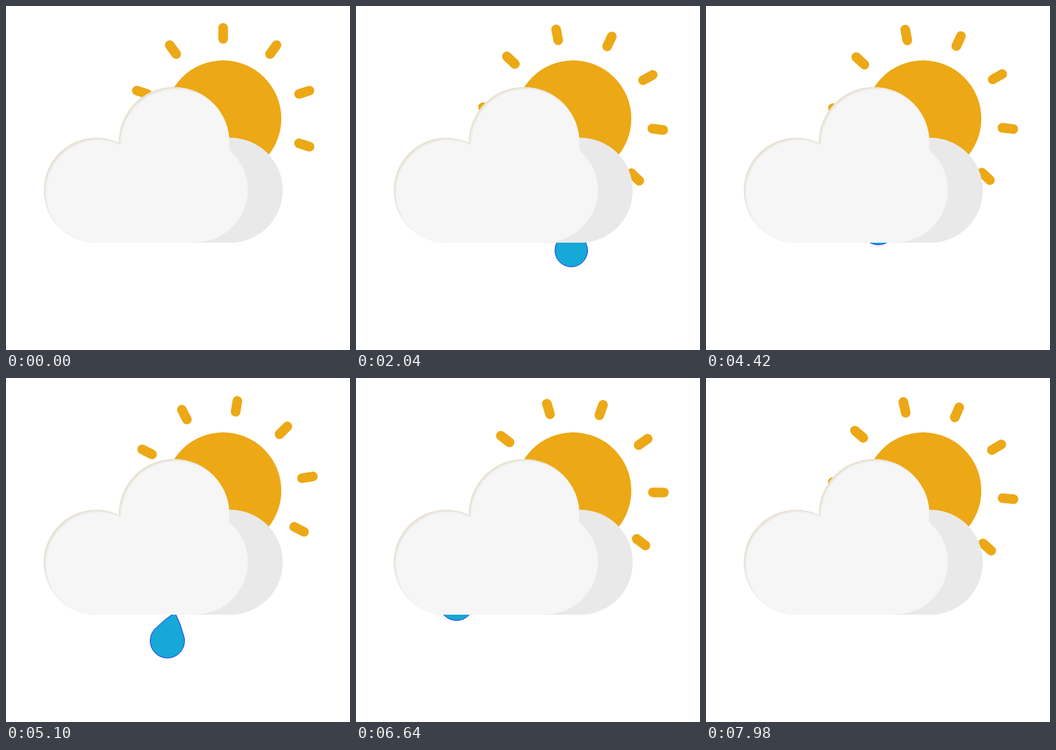
An HTML page with a canvas for the animation above (8000 ms loop, 500 px wide and 500 px high).

```html
<!DOCTYPE html>
<html lang="en">
<head>
<meta charset="utf-8">
<title>Sun, cloud and rain</title>
<style>
  html, body { margin: 0; width: 100%; height: 100%; overflow: hidden; background: #fff; }
  canvas { display: block; width: 100vw; height: 100vh; }
</style>
</head>
<body>
<canvas id="stage" width="500" height="500"></canvas>
<script>
const ctx = document.getElementById('stage').getContext('2d');
const LOOP = 8000, RAIN = 4000, TURN = 12000;
const SUN = { x: 315.6, y: 163.7, r: 84.6 };
const ORANGE = '#eca815', BLUE = '#16a8d6';
const TILT = 15 * Math.PI / 180;

// end: time of vanishing; x, bottom: resting centre x and lower edge at that time
const drops = [
  { end: 1255, x: 230.5, bottom: 422, size: 1 },
  { end: 2465, x: 302.7, bottom: 417, size: 0.95 },
  { end: 3410, x: 127.4, bottom: 422, size: 1 }
];

function cloudPath(right, y, withTop) {
  const p = new Path2D();
  const circle = (cx, cy, r) => { p.moveTo(cx + r, cy); p.arc(cx, cy, r, 0, 2 * Math.PI); };
  circle(131.2, 267.8, 76.3);
  circle(right, y, 76.3);
  p.rect(131, 230, right - 131, 114);
  if (withTop) circle(244.2, 197.8, 80.4);
  return p;
}

const backCloud = cloudPath(326, 267.8, false);
const frontCloud = cloudPath(275.3, 267.2, true);

function drawSun(t) {
  ctx.save();
  ctx.fillStyle = ctx.strokeStyle = ORANGE;
  ctx.beginPath();
  ctx.arc(SUN.x, SUN.y, SUN.r, 0, 2 * Math.PI);
  ctx.fill();
  ctx.translate(SUN.x, SUN.y);
  ctx.rotate(t / TURN * 2 * Math.PI);
  ctx.lineWidth = 14;
  ctx.lineCap = 'round';
  for (let i = 0; i < 10; i++) {
    ctx.beginPath();
    ctx.moveTo(0, -116);
    ctx.lineTo(0, -132);
    ctx.stroke();
    ctx.rotate(Math.PI / 5);
  }
  ctx.restore();
}

function drawDrop(drop, t) {
  const left = drop.end - t;
  if (left < 0 || left > 1000) return;
  const rise = drop.size * (0.098 * left - 1e-5 * left * left);
  const r = 25, tip = 42.5, bulge = 2;
  const half = Math.acos(r / tip);
  const a = half - Math.PI / 2;
  const px = r * Math.cos(a), py = r * Math.sin(a);
  // control point: middle of the flank, pushed outwards
  const cx = px / 2 + bulge * Math.cos(a);
  const cy = (py - tip) / 2 + bulge * Math.sin(a);
  ctx.save();
  ctx.translate(drop.x + rise * Math.tan(TILT), drop.bottom - r * drop.size - rise);
  ctx.rotate(TILT);
  ctx.scale(drop.size, drop.size);
  ctx.beginPath();
  ctx.moveTo(0, -tip);
  ctx.quadraticCurveTo(cx, cy, px, py);
  ctx.arc(0, 0, r, a, Math.PI - a);
  ctx.quadraticCurveTo(-cx, cy, 0, -tip);
  ctx.closePath();
  ctx.fillStyle = BLUE;
  ctx.fill();
  ctx.strokeStyle = '#1420f0';
  ctx.lineWidth = 0.8;
  ctx.stroke();
  ctx.restore();
}

function drawCloud() {
  ctx.fillStyle = '#e9e9e9';
  ctx.fill(backCloud);
  ctx.save();
  ctx.clip(frontCloud);
  ctx.fillStyle = '#e9dfcc';
  ctx.fill(frontCloud);
  // soft rim along the upper left edge: beige, then grey, then the body
  ctx.filter = 'blur(1px)';
  for (const [shift, color] of [[1.5, '#e9e7e3'], [1.6, '#f6f6f6']]) {
    ctx.translate(shift * 0.9, shift);
    ctx.fillStyle = color;
    ctx.fill(frontCloud);
  }
  ctx.restore();
}

function draw(now) {
  const t = now % LOOP;
  ctx.fillStyle = '#fff';
  ctx.fillRect(0, 0, 500, 500);
  drawSun(t);
  for (const drop of drops) drawDrop(drop, t % RAIN);
  drawCloud();
}

let start;
function tick(now) {
  start ??= now;
  draw(now - start);
  requestAnimationFrame(tick);
}
draw(0);
requestAnimationFrame(tick);
</script>
</body>
</html>
```
